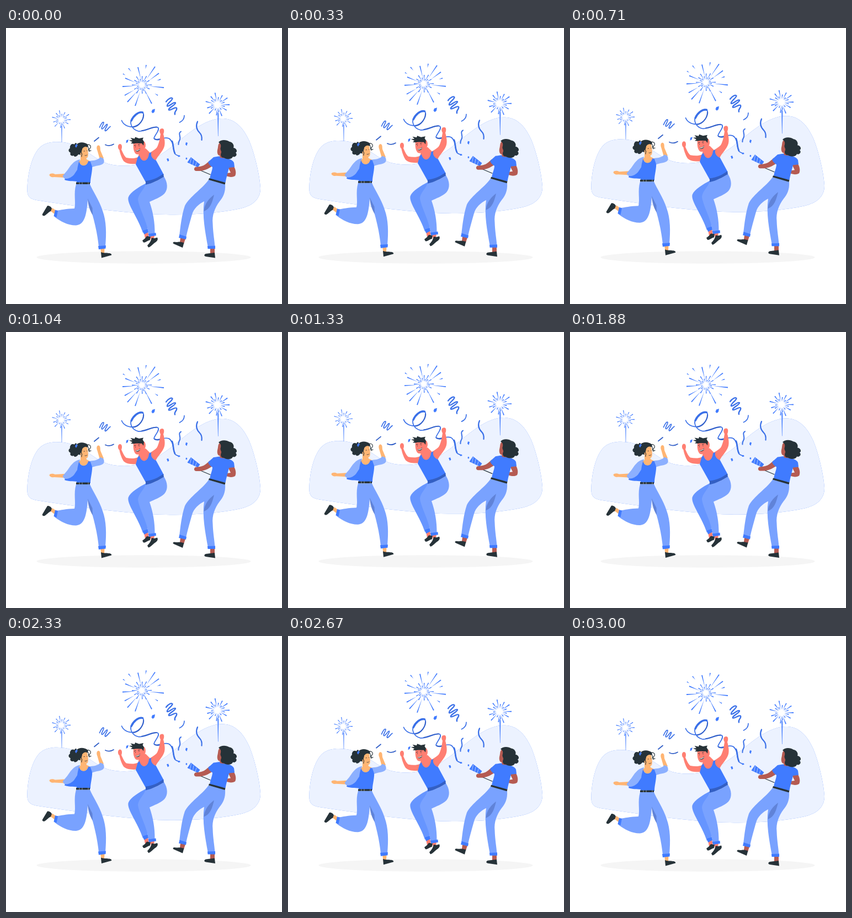
These frames come from a looping animation (500 px wide and 500 px high, 3.04 s). An HTML page:

```html
<!DOCTYPE html>
<html lang="en">
<head>
<meta charset="utf-8">
<title>Celebration</title>
<style>
  html, body { margin: 0; width: 100%; height: 100%; overflow: hidden; background: #fff; }
  svg { display: block; width: 100%; height: 100%; }
  .blue { fill: #407bff; } .pants { fill: #79a2ff; } .rear { fill: #6695ff; } .shirt { fill: #8cb0ff; }
  .shade { fill: #6083d8; } .navy { fill: #335fc4; } .dark { fill: #263238; } .white { fill: #fff; }
  .tan { fill: #ffb573; } .coral { fill: #ff7f72; } .brown { fill: #b55b52; }
  .line { fill: none; stroke-linecap: round; stroke-linejoin: round; }
  .ribbon { stroke: #3a70e8; } .fold { stroke: #3360c8; } .ink { stroke: #263238; }
</style>
</head>
<body>
<svg viewBox="0 0 500 500">
  <defs>
    <path id="blob" d="M38.5 292C39 262 48 226 64 214C76 205 94 205 110 208C138 213 160 238 185 246C208 252 232 250 252 244C285 232 310 205 340 184C360 170 378 163 394 164C418 165 432 185 441 205C452 232 460 270 461 290C461 312 445 322 425 327C385 336 330 339 290 338C220 337 130 323 62 313C44 311 38 306 38.5 292Z"/>
  </defs>
  <ellipse cx="249.500" cy="415.500" rx="194" ry="11.300" fill="#f5f5f5"/>
  <g id="scene">
    <use href="#blob" class="blue"/>
    <use href="#blob" class="white" opacity=".9"/>

    <path id="sparks" class="blue"/>
    <path class="blue" d="M100.200 177L101.700 177L101.300 207L100.700 207ZM383.200 153C384.500 151 385.500 155 385.300 160L384.500 196L384 196Z"/>

    <!-- Confetti -->
    <g class="line ribbon" stroke-width="1.700">
      <path d="M169.500 180C172 174 175 169.500 177 171C178 173 171 182 174 183C177 183 181 173.500 183.500 174.500C185 176 177 185 180 186.500C183 186 186 180 189 178.500"/>
      <path stroke-width="2.300" d="M290 133.500C294 128 300 125 301.500 127.500C302 131 290 138 292 141.500C295 143 304 133 307 135.500C308 139 293 145 295 148.500C298 150 307 142 309 145C311 149 304 151 306 156.500"/>
      <path d="M209.500 167.500C212 174 219 179 229 179C243 178 251 163 249 155C246 149 234 154 228 164C223 173 228 184 240 187C253 188 267 177 275 180C280 184 269 194 268 200C273 206 285 196 295 200C304 205 302 220 306 228C309 231 312 231 314 232"/>
      <path stroke-width="3.400" d="M247.500 153C240 151 231 159 227 168"/>
      <path stroke-width="2.600" d="M301 205C304 212 302 219 306 227"/>
      <path stroke-width="2.200" d="M347 169.500C343 178 346 185 351 190C355 194 355 199 354.500 203"/>
      <path d="M323 158.500C323 165 319 169 314.500 171"/>
      <path stroke-width="2" d="M317 187.500C311 191 317 196 315 202C313 206 312 208 312.500 211"/>
    </g>
    <g class="line fold" stroke-width="1.800">
      <path d="M160 205L168 198.500M180 211.500C185 214 191 213 195 210.500"/>
      <path d="M231 179.500C242 178 249 166 249 157M246 186C256 185 264 179 273 179.500M269 201C273 204 280 202 285 199.500"/>
    </g>
    <path class="blue" d="M265 148L270 146.500L269 152L266 154.500L263.500 152ZM218 203.500L222 202L220.500 207L217.500 208.500ZM326 207L329 208L327.500 213.500L325 211ZM291 237L294 236L295.500 240L293 242ZM326 234.500L328.500 235.500L327.500 238.500L325.500 237.500ZM311 231L315 230.500L315.500 233L312 233.500Z"/>

    <!-- Left dancer -->
    <path class="tan" d="M106 264L89 265C85 263 80 263 78.500 266C79 269 83 271 87 270L105 271Z"/>
    <path class="tan" d="M80 331L84 326L91 331L88 337ZM171 399H178.500L178 409L173 411Z"/>
    <path class="dark" d="M75 322C79 322 82 324 83 327L81 332C77 333 74 338 70 340C67 341 65 339 66 337ZM172 406C176 408 182 407 186 408C190 408 192 410 191 411.500L173 416.500Z"/>
    <path class="blue" d="M112 259L106 275C113 278 121 277 129 278V253Z"/>
    <path class="pants" d="M127 283C122 300 127 315 124 327C110 327 98 330 91 331L88 342C99 351 114 358 127 357.500C142 356 146 340 148 311C160 345 166 375 168 396H180C182 372 182 350 175 331C169 312 157 295 152 283Z"/>
    <path class="shade" d="M148 309L156.500 326L157 339C152 331 149 322 148 309Z"/>
    <path class="blue" d="M89 329.500L94 331L91.500 343L86.500 341ZM167 395L181 394L180.500 399.500L168 401Z"/>
    <path class="shirt" d="M134 238C122 240 116 251 111 258L102.500 268L105 272C112 275 119 270 123 266L131 254Z"/>
    <path class="tan" d="M170 238L165.500 222C163 216 165 212 168 212.500C172 214 170 219 171.500 223L177 236Z"/>
    <path class="shirt" d="M149 241C158 240 166 240 171 234L176 236C179 241 178 245 174 247C168 250 160 249 153 254Z"/>
    <path class="tan" d="M135 225V239L131 243L141 252L152 241L146 238L145 233Z"/>
    <path class="blue" d="M132.500 241C134 252 147 252 149 241L153 242C154 247 157 250 156 256C155 267 153 272 153 281H128C128 268 128 255 132.500 241Z"/>
    <path class="dark" d="M127 279.500H152V283H127Z"/>
    <path class="line" stroke="#fff" stroke-width=".5" d="M133 279.800V282.800M138 279.800V282.800M149 279.800V282.800"/>
    <path class="dark" d="M128 211C132 206 142 206 148 211C150 214 147 217 144 218L139 222L137 230L131 229C128 234 123 234 123 231C118 233 115 229 117 226C112 224 113 219 116 218C115 212 120 208 124 211C125 207 129 208 128 211Z"/>
    <path class="tan" d="M136 225C137 217 143 213 147 216C149 223 150 233 147 235C143 237 139 234 137 231C134 230 134 226 136 225Z"/>
    <path class="blue" d="M127 210L130 212L127 217L125 214Z"/>
    <g class="line ink" stroke-width="1.100">
      <path d="M145 213C151 208 156 215 152 218C149 220 151 224 154 222M147 214C151 215 148 220 151 224M137 219C139 221 134 225 137 227C139 229 136 231 137 233"/>
      <path stroke-width=".8" d="M141 223H142.500M146.500 222.500H147M143 231C145 231.500 146 230.500 147 230"/>
    </g>

    <!-- Middle dancer -->
    <path class="coral" d="M250 371L257 369L259 379L252 381ZM261 376L269 375L268 383L263 385Z"/>
    <path class="dark" d="M247 385L252 381L255 377L262 378L261 384C257 385 253 389 249 388.500ZM256 394C260 390 263 385 264 380L269 381L274 379.500C276 383 274 386 271 388C266 391 262 397 258 397.500Z"/>
    <path class="rear" d="M254 281C241 288 225 297 221.500 307C219 319 240 345 248 371L257 368C256 350 252 335 249 318L270 290Z"/>
    <path class="pants" d="M253 283C266 281 277 276 286 269C293 280 294 292 287 300C280 307 268 311 260 315C266 332 270 352 269.500 373L258 375C258 355 240 325 239 310C240 300 250 293 253 283Z"/>
    <path class="blue" d="M248 367L256.500 364.500L258 370L250 374ZM258 373L271.500 371L272 376L259 378Z"/>
    <path class="coral" d="M239 234L238 246C228 247 218 246 213 241C209 235 206 225 205.500 221C202 218 202 211 206 210C210 210 211 215 209 220C212 227 215 233 218 235C225 236 232 237 239 234ZM259 227C268 221 273 219 275 213C278 206 279 198 280 192C277 187 278 182 283 182C287 182 287 188 285 192C288 203 289 212 285 219C281 227 273 234 271 241L260 240ZM243 220L253 218L262 227L260 241H241L239 234Z"/>
    <path class="blue" d="M235 247L238.500 234L242 231C245 245 258 243 259 227L263.500 225C261 233 267 238 272 240L286 266C275 274 264 277 254 281Z"/>
    <path class="navy" d="M253 277C265 276 276 271 285 264L286 269.500C276 276 266 281 253 284Z"/>
    <path class="coral" d="M231 208C230 216 231 224 235 228C240 231 247 227 248 221C254 219 254 210 251 206L244 204Z"/>
    <path class="dark" d="M226 209L229 206.500L223 203.500L229 203L225.500 199L233 200.500L234 197.500L241 200L249 198.500L247.500 202L250 206L249 213L246 209C241 209 236 208 231 209.500Z"/>
    <path class="dark" d="M234.500 221C238 222 241 220 243 217.500C243.500 222 240 224.500 236 223.500Z"/>
    <path class="white" d="M235 221.500C238 222 241 220.500 242.800 218.500L242.600 220C240 222.500 238 223 235.500 222.600Z"/>
    <path class="line ink" stroke-width=".9" d="M234.500 215V215.500M241 213.500V214M232.500 213L235 212M239.500 211.500L242 211"/>

    <!-- Right dancer -->
    <path class="brown" d="M316 380L325 382L322 391L315 388ZM370 399H378V409H370Z"/>
    <path class="dark" d="M322.500 389C318 388 315 387 310 388L304 387.500C302 389 302 390 304 391L320 398ZM378 407L379 416.500L362 414C358 413 359 410 362 409L370 408Z"/>
    <path class="brown" d="M402 252L413 251C417 258 417 264 415 268C410 271 404 270 399 268L400 263L407 262Z"/>
    <path class="pants" d="M367 275L397 283C398 298 393 307 387 314C378 326 373 340 374.500 354C375 372 378 386 378.500 397L366 398C361 370 355 340 359 314C349 319 340 327 337 338C333 352 329 366 326 379.500L314 377C316 360 318 340 324 322C333 305 355 292 367 275Z"/>
    <path class="shade" d="M377 302C372 306 360 315 358.500 332C370 328 374 315 377 302Z"/>
    <path class="blue" d="M314.500 374L327 378L326 383L313 380ZM365 395L379 394.500V400H365.500Z"/>
    <path class="line ink" stroke-width="1.200" d="M350 257L370 265.500"/>
    <path class="blue" d="M335 234L351.500 247L347.500 252.500L328.500 243.500Z"/>
    <path class="line" stroke="#fff" stroke-width=".6" d="M335.500 236L333.500 245M340 239.500L338.500 247.500M345 243.500L343 250"/>
    <path class="brown" d="M369 240C362 247 358 250 351 251L343 252C340 254 340 258 344 259H352C360 258 370 254 376 248Z"/>
    <path class="blue" d="M376 234C381 233 388 232 392 233C400 236 411 238 413 244L414 252L404 253C402 262 399 271 397.500 280L369 274C370 265 374 258 374 252C370 250 367 246 366 243Z"/>
    <path class="dark" d="M368 272L397.500 280L396.500 283.500L367 275Z"/>
    <path class="brown" d="M388 207C383 211 385 215 383 221C382 227 384 231 387 231L388 235L396 236L398 216Z"/>
    <path class="dark" d="M385 207C389 202 399 202 405 206C411 207 414 213 412 217C418 218 420 224 416 226C420 229 416 235 411 233C409 239 398 238 395 235C389 235 388 230 390 226C391 222 387 221 389 216C390 211 388 209 385 207Z"/>
  </g>
</svg>
<script>
  // A sliver that widens from its inner end to its tip.
  function ray(cx, cy, angle, inner, outer, width) {
    const c = Math.cos(angle), s = Math.sin(angle), w = width / 2;
    const x = cx + c * outer, y = cy + s * outer;
    return `M${cx + c * inner} ${cy + s * inner}L${x - s * w} ${y + c * w}L${x + s * w} ${y - c * w}Z`;
  }

  function burst(cx, cy, count, radius, width) {
    let d = "";
    for (let i = 0; i < count; i++) {
      const outer = radius * [1, .62, .88, .5][i % 4];
      d += ray(cx, cy, (i + .2 * Math.sin(i * 5)) * 2 * Math.PI / count, radius * .25, outer, width);
    }
    return d;
  }

  // Tip x, tip y and the share of the radius left empty.
  const tips = [
    [-8, -33, .3], [7, -37, .8], [-25, -31, .8], [23, -34, .3], [30, -22, .4],
    [33, -11, .8], [39, 4, .3], [28, 18, .8], [17, 33, .3], [-13, 37, .3],
    [-27, 30, .35], [-36, 2, .35], [-31, -13, .4], [-35, -21, .88], [-32, 18, .45]
  ];
  const big = tips.map(([x, y, gap]) => {
    const r = Math.hypot(x, y);
    return ray(247, 104, Math.atan2(y, x), r * gap, r, 1.9);
  }).join("");
  document.getElementById("sparks").setAttribute("d",
    big + burst(246, 103, 24, 18, 1.6) + burst(100, 166, 22, 17, 1.4) + burst(383, 139, 22, 22, 1.9));

  const scene = document.getElementById("scene");
  const LOOP = 3040, FLOAT = 3000, RISE = 10;

  function draw() {
    const t = Math.min(performance.now() % LOOP, FLOAT);
    const y = -RISE * (1 - Math.abs(1 - 2 * t / FLOAT));
    scene.setAttribute("transform", `translate(0 ${y})`);
    requestAnimationFrame(draw);
  }
  draw();
</script>
</body>
</html>
```
